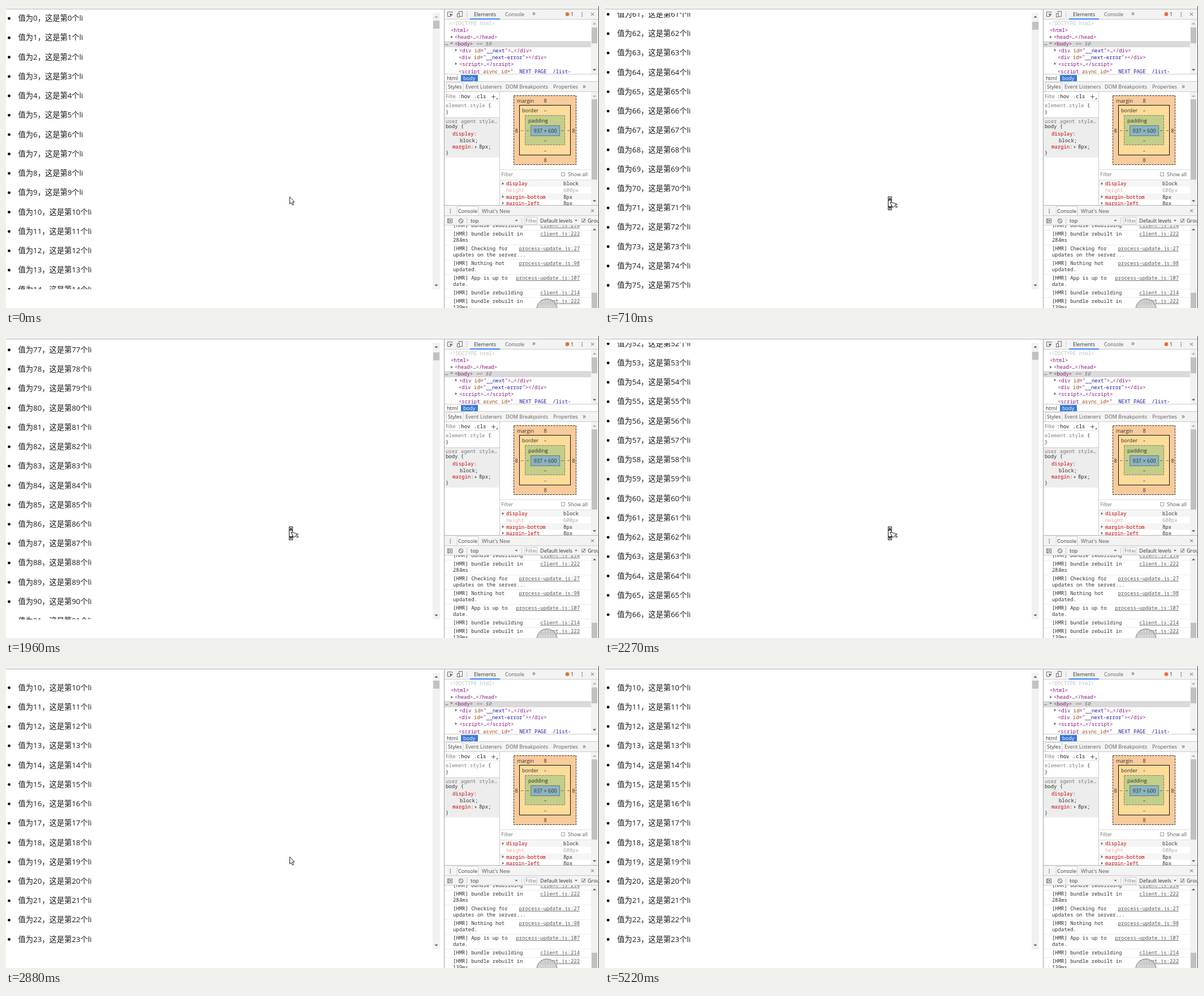
An HTML page with a canvas that plays this animation: 1048 by 534 pixels, repeating every 5280 ms.

```html
<!DOCTYPE html>
<html lang="zh">
<head>
<meta charset="utf-8">
<title>Long list scrolling</title>
<style>
html, body { margin: 0; width: 100%; height: 100%; overflow: hidden; background: #fff; }
canvas { display: block; }
</style>
</head>
<body>
<canvas id="stage" width="1048" height="534"></canvas>
<script>
const ctx = document.getElementById('stage').getContext('2d');
const LOOP = 5280, ROW = 34.24;
const SANS = '9.1px "Open Sans", "Noto Sans", sans-serif';
const MONO = '8.95px "Noto Sans Mono", "DejaVu Sans Mono", monospace';
const LIST = '13.25px "Open Sans", "Noto Sans CJK SC", "Noto Sans CJK", sans-serif';
const TAG = '#881280', ATTR = '#994500', VALUE = '#1a1aa6', RED = '#c80000';
const INK = '#303030', DIM = '#808080', BAR = '#f3f3f3', EDGE = '#cccccc';

// Timing: the picture changes only at these moments.
const steps = (from, to, n) => Array.from({ length: n }, (_, i) => from + (to - from) * i / (n - 1));
const scrollTimes = [0, ...steps(150, 710, 8), 790, ...steps(890, 980, 2),
  1720, ...steps(1810, 2190, 6), 2270, ...steps(2340, 2740, 6), 2800, 2880];
const scrollKeys = [[0, 0], [70, 0], [150, 10], [710, 2096], [980, 2805], [1640, 2805],
  [1720, 2794], [2270, 1789], [2740, 357], [2800, 333], [2880, 326]];
const pointerKeys = [[0, 501, 337], [3500, 548, 353], [3580, 595, 369], [3660, 641, 385],
  [3920, 706, 417], [3980, 771, 449], [4040, 835, 480], [4270, 889, 505], [4345, 943, 529], [4420, 990, 560]];

const latest = (list, test) => list.filter(test).pop();

// Monotone cubic curve through the scroll keys: eases in and out, never overshoots.
const slope = i => {
  const a = scrollKeys[i], b = scrollKeys[i + 1];
  return a && b ? (b[1] - a[1]) / (b[0] - a[0]) : 0;
};
const tangent = i => {
  const before = slope(i - 1), after = slope(i);
  return before * after > 0 ? 2 * before * after / (before + after) : 0;
};

function scrollAt(time) {
  const t = latest(scrollTimes, s => s <= time + 0.5);
  const i = scrollKeys.findIndex(k => k[0] >= t) - 1;
  if (i < 0) return scrollKeys[0][1];
  const [t0, a] = scrollKeys[i], [t1, b] = scrollKeys[i + 1];
  const span = t1 - t0, u = (t - t0) / span, v = 1 - u;
  return a * (1 + 2 * u) * v * v + b * u * u * (3 - 2 * u) +
    span * u * v * (tangent(i) * v - tangent(i + 1) * u);
}

// Drawing helpers
function rect(x, y, w, h, color) {
  ctx.fillStyle = color;
  ctx.fillRect(x, y, w, h);
}

function frame(x, y, w, h, color, dash = []) {
  ctx.strokeStyle = color;
  ctx.lineWidth = 1;
  ctx.setLineDash(dash);
  ctx.strokeRect(x + 0.5, y + 0.5, w - 1, h - 1);
  ctx.setLineDash([]);
}

function path(points, fill, stroke, closed = true) {
  ctx.beginPath();
  points.forEach(([x, y]) => ctx.lineTo(x, y));
  if (closed) ctx.closePath();
  if (fill) { ctx.fillStyle = fill; ctx.fill(); }
  if (stroke) { ctx.strokeStyle = stroke; ctx.lineWidth = 1; ctx.stroke(); }
}

function disc(x, y, r, fill, stroke) {
  ctx.beginPath();
  ctx.arc(x, y, r, 0, Math.PI * 2);
  if (fill) { ctx.fillStyle = fill; ctx.fill(); }
  if (stroke) { ctx.strokeStyle = stroke; ctx.lineWidth = 1; ctx.stroke(); }
}

function text(str, x, y, color = INK, font = SANS, align = 'left') {
  ctx.font = font;
  ctx.fillStyle = color;
  ctx.textAlign = align;
  ctx.fillText(str, x, y + 3.3);
}

const code = (str, x, y, color = INK) => text(str, x, y, color, MONO);
const middle = (str, x, y) => text(str, x, y, INK, SANS, 'center');

function runs(x, y, ...parts) {
  for (const [str, color] of parts) {
    code(str, x, y, color);
    x += ctx.measureText(str).width;
  }
}

function clipped(x, y, w, h, draw) {
  ctx.save();
  ctx.beginPath();
  ctx.rect(x, y, w, h);
  ctx.clip();
  draw();
  ctx.restore();
}

function triangle(x, y, r, dir, color) {
  const shape = {
    up: [[-r, r / 2], [r, r / 2], [0, -r / 2]],
    down: [[-r, -r / 2], [r, -r / 2], [0, r / 2]],
    right: [[-r / 2, -r], [-r / 2, r], [r / 2 + 1, 0]]
  }[dir];
  path(shape.map(([dx, dy]) => [x + dx, y + dy]), color);
}

function scrollbar(x, y, w, h, thumbY, thumbH, upColor = '#505050') {
  rect(x, y, w, h, '#f1f1f1');
  rect(x + 1, thumbY, w - 2, thumbH, '#c1c1c1');
  triangle(x + w / 2, y + 7, 3, 'up', upColor);
  triangle(x + w / 2, y + h - 7, 3, 'down', '#505050');
}

function cross(x, y) {
  path([[x - 2.5, y - 2.5], [x + 2.5, y + 2.5]], null, '#5a5a5a', false);
  path([[x + 2.5, y - 2.5], [x - 2.5, y + 2.5]], null, '#5a5a5a', false);
}

function menuDots(x, y) {
  for (const dy of [-4, -1, 2]) rect(x - 0.5, y + dy, 1.5, 1.5, '#5a5a5a');
}

function checkbox(x, y, checked) {
  rect(x, y, 7, 7, '#fff');
  frame(x, y, 7, 7, '#a0a0a0');
  if (checked) path([[x + 1.5, y + 3.5], [x + 3, y + 5.5], [x + 6, y + 1]], null, '#333', false);
}

// Page with the long list
function drawList(scroll) {
  clipped(0, 12, 754, 489, () => {
    const first = Math.max(0, Math.floor(scroll / ROW) - 1);
    for (let i = first; i < first + 18; i++) {
      const y = 21.5 + i * ROW - scroll;
      disc(5.5, y + 0.5, 2.4, '#000');
      text(`值为${i}，这是第${i}个li`, 21.6, y + 1.4, '#1a1a1a', LIST);
    }
  });
  scrollbar(754, 12, 13, 489, 26 + Math.round(scroll / 950), 14, scroll ? '#505050' : '#a3a3a3');
}

// Developer tools
function drawToolbar() {
  rect(775, 6, 273, 17, BAR);
  rect(775, 23, 273, 1, EDGE);
  path([[786, 18.5], [780.5, 18.5], [780.5, 10.5], [788.5, 10.5], [788.5, 13]], null, '#6e6e6e', false);
  path([[784, 13], [790, 15.5], [787, 16.5], [786, 19]], '#5a5a5a');
  frame(800, 9, 7, 10, '#6e6e6e');
  rect(797, 13, 5, 7, BAR);
  frame(797, 13, 5, 7, '#6e6e6e');
  rect(814, 9, 1, 11, EDGE);
  text('Elements', 827, 14.5);
  rect(820, 22, 53, 2, '#3e82f7');
  text('Console', 882, 14.5, '#5a5a5a');
  text('»', 930, 14, '#5a5a5a', SANS.replace('9.1', '12'));
  disc(992, 14.5, 3.4, '#e8703a');
  text('1', 998, 14.5);
  menuDots(1018, 15);
  cross(1036.5, 14.5);
}

function drawElements() {
  clipped(775, 24, 259, 96, () => {
    rect(775, 62, 259, 11, '#dadada');
    code('<!DOCTYPE html>', 784, 31, '#c0c0c0');
    code('<html>', 786, 43, TAG);
    triangle(787.5, 55, 2.5, 'right', '#6e6e6e');
    runs(793, 55, ['<head>', TAG], ['…', INK], ['</head>', TAG]);
    code('…', 776, 66);
    triangle(787.5, 66, 2.7, 'down', '#6e6e6e');
    code('<body>', 793, 67, TAG);
    text('== $0', 831, 67, DIM, 'italic ' + MONO);
    triangle(795, 78, 2.5, 'right', '#6e6e6e');
    runs(801, 79, ['<div ', TAG], ['id', ATTR], ['="', TAG], ['__next', VALUE], ['">', TAG], ['…', INK], ['</div>', TAG]);
    runs(800, 91, ['<div ', TAG], ['id', ATTR], ['="', TAG], ['__next-error', VALUE], ['"></div>', TAG]);
    triangle(795, 102, 2.5, 'right', '#6e6e6e');
    runs(801, 103, ['<script>', TAG], ['…', INK], ['<\/script>', TAG]);
    runs(800, 115.5, ['<script ', TAG], ['async id', ATTR], ['="', TAG], ['__NEXT_PAGE__/list-', VALUE]);
  });
  scrollbar(1034, 24, 12, 96, 38, 28, '#a3a3a3');
  rect(775, 120, 273, 1, EDGE);
  text('html', 779, 128);
  rect(804, 122, 30, 11, '#3879d9');
  text('body', 808, 128, '#fff');
}

function drawStyles() {
  rect(775, 133, 273, 18, BAR);
  rect(775, 133, 273, 1, EDGE);
  rect(775, 151, 273, 1, EDGE);
  rect(778, 135, 30, 17, '#fff');
  frame(778, 135, 30, 17, EDGE);
  text('Styles', 781, 143);
  text('Event Listeners', 812, 143, '#5a5a5a');
  text('DOM Breakpoints', 883, 143, '#5a5a5a');
  text('Properties', 967, 143, '#5a5a5a');
  text('»', 1019, 142.5, '#5a5a5a', SANS.replace('9.1', '12'));

  clipped(775, 152, 20, 15, () => text('Filter', 777, 160, '#757575'));
  code(':hov', 799, 160, '#111');
  code('.cls', 827, 160, '#111');
  path([[858, 160.5], [865, 160.5]], null, '#5a5a5a', false);
  path([[861.5, 157], [861.5, 164]], null, '#5a5a5a', false);
  path([[869, 162], [869, 165], [866, 165]], '#5a5a5a');
  rect(775, 167, 97, 1, '#dddddd');
  runs(777, 175.5, ['element.style', DIM], [' {', INK]);
  code('}', 777, 188);
  rect(775, 197, 97, 71, '#ededed');
  rect(775, 197, 97, 1, EDGE);
  code('user agent style…', 777, 204, '#777');
  code('body {', 777, 213);
  runs(789, 226, ['display', RED], [':', INK]);
  code('block;', 802, 238);
  runs(789, 249, ['margin', RED], [':', INK]);
  triangle(830, 249.5, 2.2, 'right', '#6e6e6e');
  code('8px;', 836, 249);
  code('}', 777, 260);
  rect(872, 152, 1, 200, EDGE);
}

function drawBoxModel() {
  const boxes = [
    [897, 158, 111, 123, '#f8cb9c', '#222', [3, 2]],
    [907, 175, 91, 89, '#fddc9a', '#111', []],
    [917, 193, 71, 53, '#c2ce89', '#777', [3, 2]],
    [927, 211, 52, 19, '#8bb4c0', '#777', []]
  ];
  for (const [x, y, w, h, fill, line, dash] of boxes) {
    rect(x, y, w, h, fill);
    frame(x, y, w, h, line, dash);
  }
  text('margin', 903, 168);
  text('border', 912, 185);
  text('padding', 923, 203);
  middle('937 × 600', 953, 220.5);
  for (const [x, y] of [[953, 168], [902, 220.5], [1003, 220.5], [953, 273]]) middle('8', x, y);
  for (const [x, y] of [[953, 185], [955, 203], [912, 220], [922, 220], [983, 220], [994, 220], [953, 238], [953, 256]])
    middle('–', x, y);
}

function drawComputed() {
  rect(873, 289, 161, 1, '#dddddd');
  text('Filter', 875, 298, '#757575');
  checkbox(981, 294);
  text('Show all', 993, 298, '#5a5a5a');
  rect(873, 307, 161, 1, '#dddddd');
  clipped(873, 308, 161, 44, () => {
    const rows = [['display', 'block'], ['height', '600px'], ['margin-bottom', '8px'], ['margin-left', '8px']];
    rows.forEach(([name, value], i) => {
      const y = 314 + i * 11.6, pale = name === 'height';
      if (i % 2 === 0) rect(873, y - 6, 161, 11.6, '#f5f5f5');
      if (!pale) triangle(878, y, 2.5, 'right', '#6e6e6e');
      code(name, 884, y, pale ? '#e9a9a0' : RED);
      code(value, 985, y, pale ? '#a8a8a8' : INK);
    });
  });
  scrollbar(1034, 152, 12, 200, 165, 142, '#a3a3a3');
}

function drawConsole() {
  rect(775, 352, 273, 35, BAR);
  rect(775, 352, 273, 1, '#b5b5b5');
  rect(775, 370, 273, 1, EDGE);
  rect(775, 387, 273, 1, EDGE);
  menuDots(785, 363);
  rect(797, 354, 38, 17, '#fff');
  frame(797, 354, 38, 17, EDGE);
  text('Console', 799, 362.5);
  text("What's New", 841, 362.5, '#5a5a5a');
  cross(1036.5, 362);

  frame(780, 376, 9, 8, '#6e6e6e');
  rect(782, 376, 1, 8, '#6e6e6e');
  triangle(785.5, 380, 2, 'right', '#5a5a5a');
  disc(804, 380, 3.7, null, '#5a5a5a');
  path([[801.5, 377.5], [806.5, 382.5]], null, '#5a5a5a', false);
  rect(814, 374, 1, 11, EDGE);
  text('top', 821, 380);
  triangle(902, 379.5, 2.5, 'down', '#5a5a5a');
  rect(911, 374, 1, 11, EDGE);
  rect(916, 373, 23, 13, '#fff');
  frame(916, 373, 23, 13, EDGE);
  clipped(916, 373, 21, 13, () => text('Filter', 918, 380, '#757575'));
  text('Default levels', 944, 380);
  triangle(1007.5, 379.5, 2.5, 'down', '#5a5a5a');
  checkbox(1017, 376, true);
  text('Group', 1028, 380);

  const messages = [
    [388, 'bundle rebuilding', '', 'client.js:214'],
    [403, 'bundle rebuilt in', '284ms', 'client.js:222'],
    [429, 'Checking for', 'updates on the server...', 'process-update.js:27'],
    [455, 'Nothing hot', 'updated.', 'process-update.js:98'],
    [481, 'App is up to', 'date.', 'process-update.js:107'],
    [507, 'bundle rebuilding', '', 'client.js:214'],
    [522, 'bundle rebuilt in', '139ms', 'client.js:222']
  ];
  clipped(775, 388, 259, 146, () => {
    for (const [y, line, more, link] of messages) {
      code('[HMR] ' + line, 790, y);
      code(more, 790, y + 11);
      text(link, 1014, y, '#545454', MONO, 'right');
      const width = ctx.measureText(link).width;
      rect(1014 - width, y + 4, width, 1, '#777');
      rect(775, y + (more ? 19 : 8), 259, 1, '#ececec');
    }
  });
  rect(1034, 388, 12, 146, '#f1f1f1');
  rect(1035, 507, 10, 27, '#c1c1c1');
  triangle(1040, 395, 3, 'up', '#505050');
}

function drawBall() {
  disc(956, 536, 18, 'rgba(222,222,222,.82)', '#777');
  ctx.save();
  ctx.clip();
  for (let i = -18; i <= 18; i += 3) {
    rect(956 + i, 516, 0.6, 20, 'rgba(120,120,120,.4)');
    rect(936, 536 + i, 40, 0.6, 'rgba(120,120,120,.4)');
  }
  ctx.restore();
}

function drawPointer(x, y) {
  const shape = [[0, 0], [0, 12.5], [2.8, 10], [4.7, 14.5], [6.8, 13.6], [4.9, 9.2], [8.5, 9]];
  path(shape.map(([dx, dy]) => [x + dx + 0.5, y + dy + 0.5]), '#fff', '#222');
}

function drawScrollCursor() {
  rect(500, 337, 7, 24, '#fff');
  frame(500, 337, 7, 24, '#111');
  path([[503.5, 338.5], [506, 342.5], [501, 342.5]], '#111');
  path([[503.5, 359.5], [506, 355.5], [501, 355.5]], '#111');
  rect(501, 343, 5, 1, '#111');
  rect(501, 354, 5, 1, '#111');
  const arrow = [[503.5, 346.5], [516.5, 350.5], [512.5, 352], [517, 355], [515, 356.5], [511, 353.5], [508.5, 356.5]];
  path(arrow, '#fff', '#222');
}

function draw(time) {
  rect(0, 0, 1048, 534, '#fff');
  rect(0, 0, 1048, 5, '#f2f2f2');
  rect(0, 5, 1048, 1, '#b8b8b8');
  drawList(scrollAt(time));
  drawToolbar();
  drawElements();
  drawStyles();
  drawBoxModel();
  drawComputed();
  drawConsole();
  rect(774, 6, 1, 528, '#a3a3a3');
  rect(1047, 0, 1, 534, '#444');
  drawBall();
  if (time >= 150 && time < 2740) drawScrollCursor();
  else {
    const [, x, y] = latest(pointerKeys, k => k[0] <= time);
    drawPointer(x, y);
  }
}

const start = performance.now();
function tick() {
  draw((performance.now() - start) % LOOP);
  requestAnimationFrame(tick);
}
tick();
</script>
</body>
</html>
```
